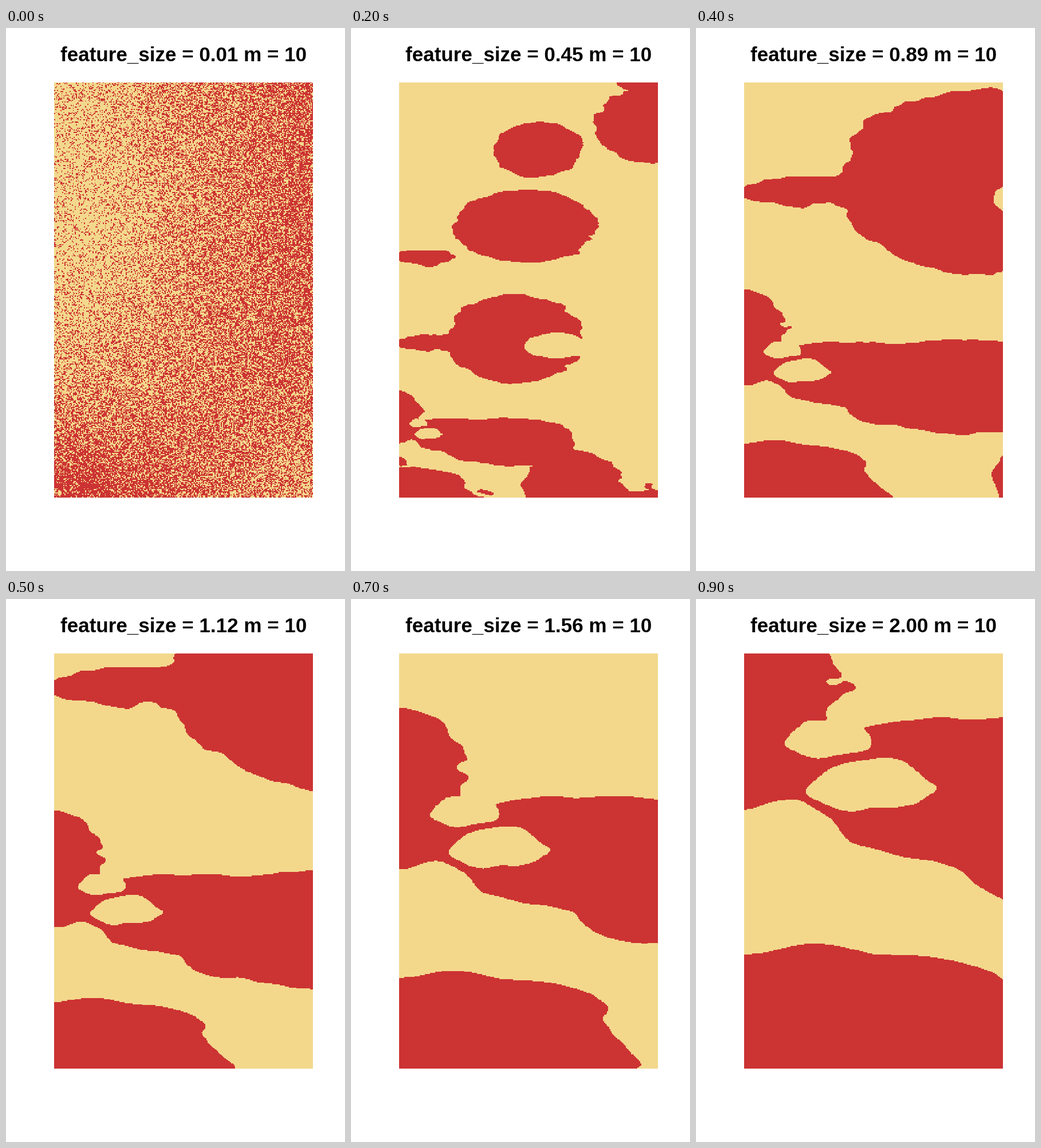
A matplotlib script that plays this animation: 592 px wide and 947 px high, repeating every 1000 ms.

```python
import numpy as np
import matplotlib.pyplot as plt
from matplotlib.animation import FuncAnimation
from matplotlib.colors import ListedColormap

WIDTH, HEIGHT, DPI = 592, 947, 100
LEFT, TOP, PANEL_W, PANEL_H = 84, 95, 452, 724
COLS, ROWS = 250, 400
SIZES = np.linspace(0.01, 2, 10)
COLORS = ListedColormap(["#f3d88c", "#cc3333"])
RED, TAN = 1, -1

# Landmarks at feature size 1, from the lower left corner:
# centre, half width, half height, colour; later ones lie on top.
LANDMARKS = [
    (450, 800, 850, 850, TAN),
    (75, 0, 185, 106, RED),
    (0, 312, 90, 102, RED),
    (200, 243, 155, 66, RED),
    (420, 215, 260, 92, RED),
    (680, 30, 190, 150, RED),
    (440, 612, 275, 175, RED),
    (95, 598, 120, 32, RED),
    (470, 1045, 290, 145, RED),
    (90, 925, 145, 32, RED),
    (530, 1340, 180, 110, RED),
    (950, 1430, 190, 140, RED),
    (77, 287, 38, 15, TAN),
    (118, 245, 52, 21, TAN),
    (600, 585, 115, 50, TAN),
]

rng = np.random.default_rng(7)
LATTICE = rng.normal(size=(1024, 1024))

s, t = np.meshgrid((np.arange(COLS) + .5) / COLS, (np.arange(ROWS) + .5) / ROWS)
tilt = 1 - 2.2 * t**4
hollow = .6 * np.exp(-((s - .2)**2 + (t - .33)**2) / .04)
TREND = t**4 - .3 + 2.2 * (s - .5) * tilt - hollow


def value_noise(u, v):
    """Smoothly interpolated random lattice."""
    i, j = np.floor(u).astype(int), np.floor(v).astype(int)
    a, b = u - i, v - j
    a, b = a * a * (3 - 2 * a), b * b * (3 - 2 * b)

    def at(di, dj):
        return LATTICE[(j + dj) % 1024, (i + di) % 1024]
    low = at(0, 0) * (1 - a) + at(1, 0) * a
    high = at(0, 1) * (1 - a) + at(1, 1) * a
    return low * (1 - b) + high * b


def fractal(u, v, cell_u, cell_v, octaves):
    total = 0
    for k in range(octaves):
        zoom = 2.1 ** k
        total = total + value_noise(u / cell_u * zoom + 37 * k,
                                    (v + .12 * u) / cell_v * zoom + 91 * k) / 2**k
    return total


def landscape(size):
    """Features grow from the lower left corner while the trend stays put."""
    u, v = s * PANEL_W / size, (1 - t) * PANEL_H / size
    land = .7 * fractal(u, v, 157, 53, 3)
    warp_u = u + 9 * fractal(u + 500, v, 60, 25, 2)
    warp_v = v + 4 * fractal(u, v + 500, 60, 25, 2)
    for cu, cv, ru, rv, color in LANDMARKS:
        distance = np.hypot((warp_u - cu) / ru, (warp_v - cv) / rv)
        weight = .85 / (1 + np.exp(np.clip((distance - 1) / .06, -50, 50)))
        land = land + weight * (color - land)
    return land + .35 * TREND > 0


fig = plt.figure(figsize=(WIDTH / DPI, HEIGHT / DPI), dpi=DPI, facecolor="white")
ax = fig.add_axes([LEFT / WIDTH, 1 - (TOP + PANEL_H) / HEIGHT,
                   PANEL_W / WIDTH, PANEL_H / HEIGHT])
ax.axis("off")
image = ax.imshow(np.zeros((ROWS, COLS)), cmap=COLORS, vmin=0, vmax=1,
                  aspect="auto", interpolation="nearest")
title = fig.text((LEFT + PANEL_W / 2) / WIDTH, 1 - 58 / HEIGHT, "", ha="center",
                 va="baseline", family="Liberation Sans", weight="bold", size=25.2)


def update(k):
    image.set_data(landscape(SIZES[k]).astype(float))
    title.set_text(f"feature_size = {SIZES[k]:.2f} m = 10")
    return image, title


anim = FuncAnimation(fig, update, frames=len(SIZES), interval=100, repeat=True,
                     repeat_delay=0)
plt.show()
```
